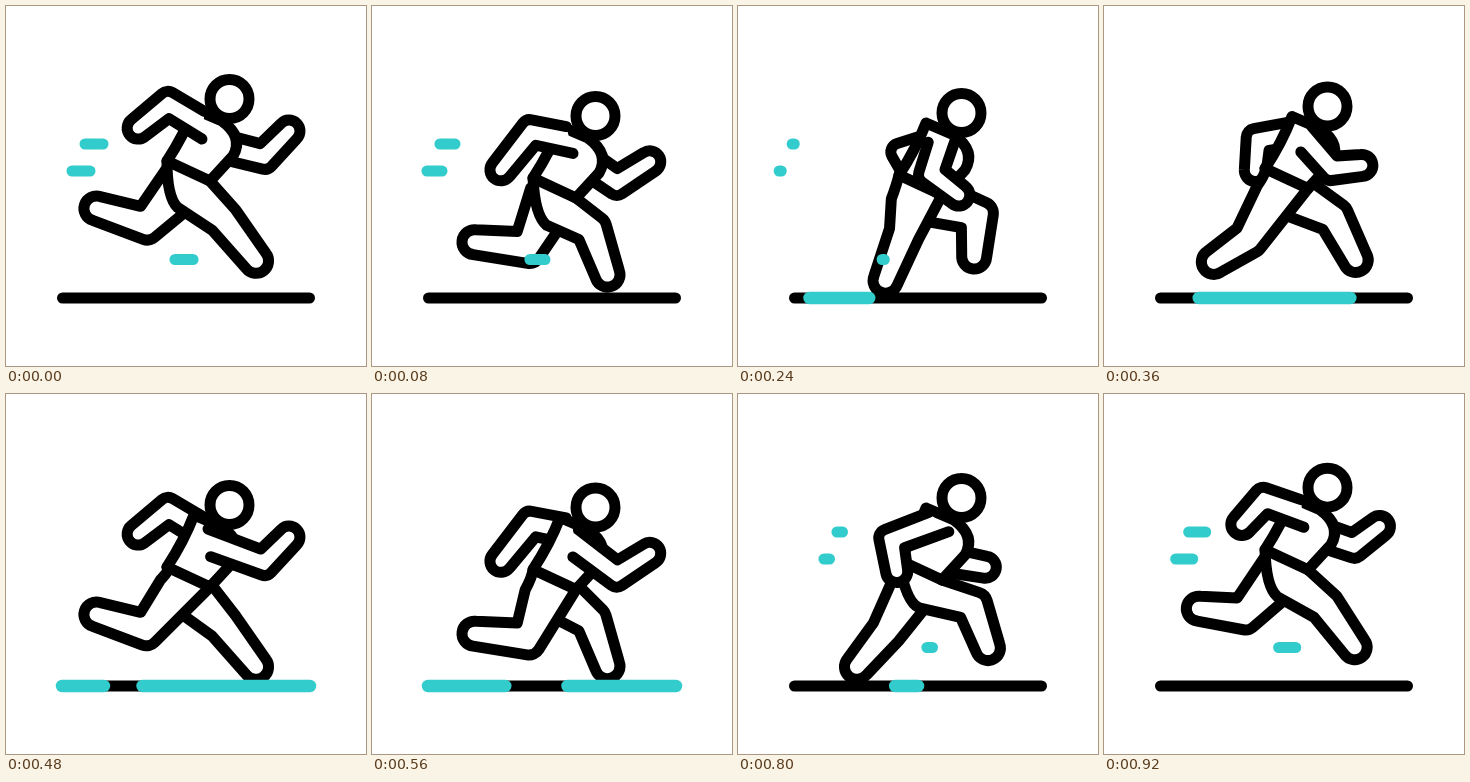
An HTML page with a canvas that plays this animation: 360 by 360 pixels, repeating every 960 ms.

```html
<!DOCTYPE html>
<html lang="en">
<head>
<meta charset="utf-8">
<title>Runner</title>
<style>
  html, body { margin: 0; width: 100%; height: 100%; overflow: hidden; background: #fff; }
  canvas { display: block; width: 360px; height: 360px; }
</style>
</head>
<body>
<canvas id="stage" width="360" height="360"></canvas>
<script>
const ctx = document.getElementById('stage').getContext('2d');
const LOOP = 960, STEP = 40, HALF = LOOP / 2;
const INK = '#000', CYAN = '#33cccc', LINE = 11;

// Endless smooth curve through key poses: [time, value, value, ...]
function cycle(poses) {
  const shift = d => p => [p[0] + d, ...p.slice(1)];
  const keys = [...poses.slice(-2).map(shift(-LOOP)), ...poses, ...poses.slice(0, 2).map(shift(LOOP))];
  const slope = (i, k) => (keys[i + 1][k] - keys[i - 1][k]) / (keys[i + 1][0] - keys[i - 1][0]);
  return time => {
    const t = time % LOOP;
    let i = 1;
    while (keys[i + 1][0] <= t) i++;
    const a = keys[i], b = keys[i + 1], d = b[0] - a[0];
    const x = (t - a[0]) / d, y = 1 - x;
    return a.slice(1).map((v, j) => v * y * y * (1 + 2 * x) + b[j + 1] * x * x * (3 - 2 * x)
      + d * x * y * (slope(i, j + 1) * y - slope(i + 1, j + 1) * x));
  };
}

const bob = cycle([[0, 93], [80, 110], [240, 107], [400, 100], [480, 111], [640, 113], [800, 104]]);

// One stride, shared by both sides half a loop apart:
// time, middle joint x, y, end x, y, with y measured from the head
const armSwing = cycle([
  [0, 162, 5, 131, 30],
  [80, 159, 16, 128, 55],
  [240, 193, 61, 222, 83],
  [480, 258, 58, 284, 31],
  [560, 245, 67, 279, 45],
  [640, 207, 77, 246, 88],
  [720, 166, 41, 178, 63],
  [800, 153, 42, 159, 75]
]);
const legSwing = cycle([
  [0, 218, 121, 251, 163],
  [80, 220, 114, 236, 160],
  [240, 166, 121, 147, 169],
  [320, 148, 134, 118, 170],
  [480, 139, 125, 89, 109],
  [560, 154, 132, 101, 126],
  [640, 222, 120, 156, 139],
  [720, 240, 104, 236, 145]
]);

const progress = (t, from, span) => Math.min(Math.max((t - from) / span, 0), 1);
const ease = (t, from, span) => (1 - Math.cos(Math.PI * progress(t, from, span))) / 2;

const dir = (a, b) => {
  const x = b[0] - a[0], y = b[1] - a[1], l = Math.hypot(x, y) || 1;
  return [x / l, y / l];
};
const add = (p, d, k) => [p[0] + d[0] * k, p[1] + d[1] * k];
const normal = (d, s) => [-d[1] * s, d[0] * s];
const dot = (a, b) => a[0] * b[0] + a[1] * b[1];

// Open outline of a bent limb; with a waist it starts and ends on the belt line
function limb(a, b, end, [ra, rb, rc], waist) {
  const u = dir(a, b), v = dir(b, end), c = add(end, v, -1.5);
  const side = (s, to) => {
    const n = normal(u, s), m = normal(v, s);
    const k = rb / Math.max(1 + dot(u, v), 0.4);
    const p = [b[0] + (n[0] + m[0]) * k, b[1] + (n[1] + m[1]) * k];
    if (dot(n, v) < 0) ctx.arcTo(...p, ...to, rb * 0.75);
    else ctx.lineTo(...p);
  };
  const seat = add(a, normal(u, 1), ra);
  const first = waist ? waist[0] : add(add(a, normal(u, -1), ra), u, -12);
  const last = waist ? add(seat, u, 12) : seat;
  const turn = Math.atan2(v[1], v[0]);
  ctx.beginPath();
  ctx.moveTo(...first);
  side(-1, add(c, normal(v, -1), rc));
  ctx.arc(...c, rc, turn - Math.PI / 2, turn + Math.PI / 2);
  side(1, last);
  ctx.lineTo(...last);
  if (waist) ctx.quadraticCurveTo(...add(seat, u, -3), ...waist[1]);
  paint();
}

function paint() {
  ctx.fill();
  ctx.stroke();
}

function bar(x1, x2, y, color, width) {
  ctx.strokeStyle = color;
  ctx.lineWidth = width;
  ctx.beginPath();
  ctx.moveTo(x1, y);
  ctx.lineTo(Math.max(x2, x1 + 0.1), y);
  ctx.stroke();
}

function runner(t) {
  const [b] = bob(t);
  const at = (x, y) => [x, y + b];
  const hip = at(180, 83), waist = [at(204, 82), at(161, 62)];

  // The shoulder follows the hand a little
  const arm = (time, pull) => {
    const [ex, ey, hx, hy] = armSwing(time), reach = (hx - 130) * pull;
    limb(at(192 + reach, 23 + reach), at(ex, ey), at(hx, hy), [12.5, 12, 11]);
  };
  const leg = (time, belt) => {
    const [kx, ky, fx, fy] = legSwing(time);
    limb(hip, at(kx, ky), at(fx, fy), [24, 15.5, 12.5], belt);
  };

  ctx.strokeStyle = INK;
  ctx.lineWidth = LINE;
  arm(t + HALF, 0.16);
  leg(t + HALF);
  leg(t, waist);

  ctx.beginPath();
  ctx.moveTo(...at(188, 10));
  ctx.lineTo(...at(216, 22));
  ctx.quadraticCurveTo(...at(238, 38), ...at(227, 57));
  ctx.lineTo(...waist[0]);
  ctx.lineTo(...waist[1]);
  ctx.quadraticCurveTo(...at(178, 36), ...at(188, 10));
  ctx.closePath();
  paint();

  arm(t, 0.11);

  ctx.beginPath();
  ctx.arc(223.5, b, 19.5, 0, Math.PI * 2);
  paint();
}

// A dash that runs along the ground and wraps around once
function groundDash(t) {
  if (t < 120 || t >= 880) return;
  const left = 56, len = 248, offset = len / 2 * progress(t, 160, 640);
  const from = offset + len * ease(t, 390, 510), to = offset + len * ease(t, 80, 490);
  for (const wrap of [0, len]) {
    const a = Math.max(from - wrap, 0), z = Math.min(to - wrap, len);
    if (z >= a) bar(left + a, left + z, 292, CYAN, 12.5);
  }
}

function wind(time) {
  const t = time < 400 ? time + LOOP : time;
  if (t < 760 || t >= 1240) return;
  const l = 104.5 - 51 * ease(t, 680, 560), r = 104.5 - 51 * ease(t, 860, 400);
  for (const [dx, y] of [[0, 138], [-13, 165], [90, 253.5]]) bar(l + dx, r + dx, y, CYAN, LINE);
}

function draw(t) {
  ctx.fillStyle = '#fff';
  ctx.fillRect(0, 0, 360, 360);
  ctx.lineCap = ctx.lineJoin = 'round';
  bar(56.5, 303.5, 292, INK, LINE);
  runner(t);
  groundDash(t);
  wind(t);
}

const start = performance.now();
function tick() {
  const t = (performance.now() - start) % LOOP;
  draw(Math.floor(t / STEP) * STEP);
  requestAnimationFrame(tick);
}
tick();
</script>
</body>
</html>
```
